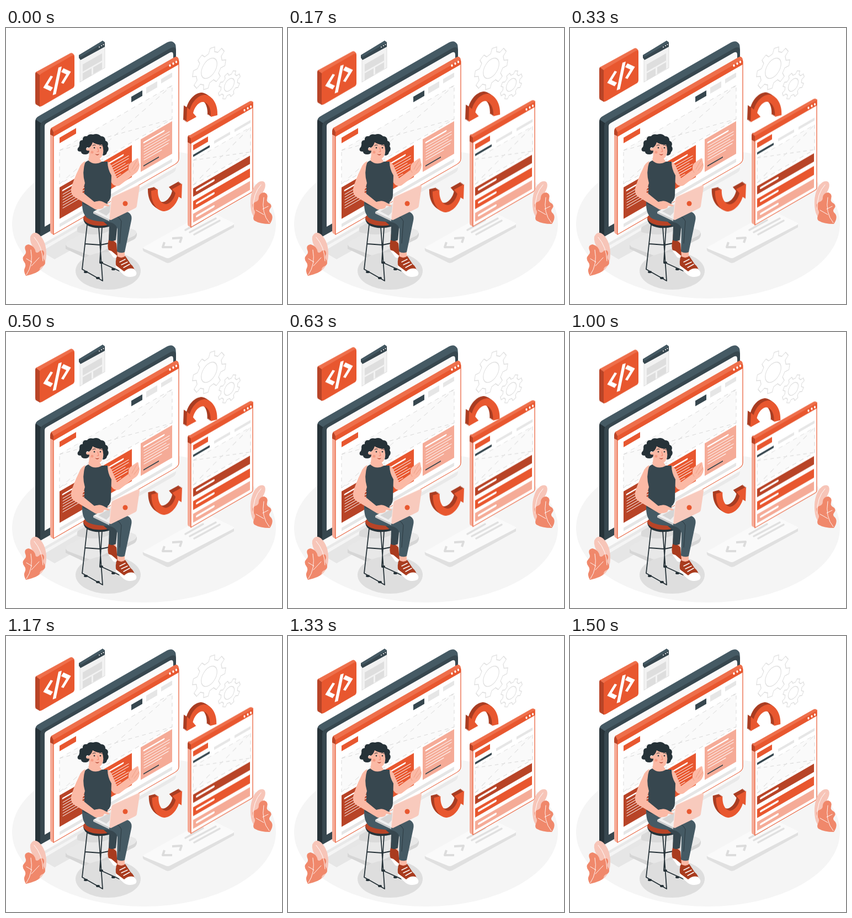
These frames come from a looping animation (500 px wide and 500 px high, 1.54 s). An HTML page:

```html
<!DOCTYPE html>
<html lang="en">
<head>
<meta charset="utf-8">
<title>Responsive web design</title>
<style>
html,body{margin:0;width:100%;height:100%;overflow:hidden;background:#fff}
svg{display:block;width:100%;height:100%}
.o{fill:#e8572f}.d{fill:#b84427}.l{fill:#f5ab97}.w{fill:#fff}.g{fill:#e6e6e6}.k{fill:#37474f}.n{fill:#263238}.s{fill:#fbb9a5}
.line{fill:none;stroke-linecap:round;stroke-linejoin:round}
.dash{fill:none;stroke:#d6d6d6;stroke-width:.9;stroke-dasharray:7 6}
.float{animation:rise .77s cubic-bezier(.37,0,.63,1) -45ms infinite alternate}
#code{--h:-18.5px}
#page{--h:-9px}
#arrows{transform-origin:320px 225px;animation:beat 1.54s ease-in-out infinite}
#arrows .d{fill:#a93d22}
@keyframes rise{to{transform:translateY(var(--h))}}
@keyframes beat{
0%{transform:scale(1)}
10%{transform:scale(1.018)}
21.4%{transform:scale(1.004)}
31%{transform:scale(.992)}
40.9%{transform:scale(1.008)}
51%{transform:scale(1.03)}
64.5%,97.4%{transform:scale(.972)}
100%{transform:scale(1)}
}
</style>
</head>
<body>
<svg viewBox="0 0 500 500">
<defs>
<g id="text" class="line" stroke="#fff" stroke-width="1.1">
<path d="M6 9h36" stroke-width="2.800"/>
<path d="M6 16h46M6 21h46M6 26h40M6 31h46M6 36h44M6 41h32"/>
</g>
<path id="arrow" d="M383 158L371 161C372 143 364 133 355 134C347 136 341 145 339 154L345 161L327 171L328 144L333 148C338 131 350 121 361 121C375 123 384 139 383 158Z"/>
</defs>

<ellipse cx="250" cy="355" rx="239" ry="135" fill="#f5f5f5"/>
<g id="gears" fill="#fff" stroke="#e0e0e0" stroke-width="1.400" stroke-linejoin="round"></g>

<!-- small window -->
<g transform="translate(134 56) skewY(-30)">
<path fill="#f2f2f2" stroke="#dedede" d="M0 0h45v42H0z"/>
<path fill="#dedede" d="M5 13h35v13H5zM5 29h16v13H5zM24 29h16v12H24z"/>
</g>
<path d="M132 54V49L175 23L179 26V34L135 58Z" class="k"/>
<path d="M132 50L175 23L179 26L136 52Z" fill="#455a64"/>
<g class="w"><circle cx="169" cy="34.500" r="1"/><circle cx="173" cy="32" r="1"/><circle cx="176.500" cy="30" r="1"/></g>

<!-- monitor -->
<path d="M64 405L88 419L190 362L165 345Z" fill="#e6e6e6"/>
<path d="M108 393V400L148 419Q156 421 163 417L232 383Q238 379 237 371Z" fill="#d6d6d6"/>
<path d="M108 391Q108 388 113 386L184 347L233 366Q240 370 233 376L163 410Q156 414 149 411L112 397Q108 394 108 391Z" fill="#e8e8e8"/>
<path d="M132 338L200 305L190 365Q172 380 130 370Q127 366 131 358Z" fill="#dadada"/>
<path d="M53 372L62 377L308 240V253Q308 259 303 262L66 397Q62 398 60 394Z" fill="#e9e9e9"/>
<path d="M62 378L308 245V252L62 394Z" fill="#fafafa"/>
<path class="n" d="M53 372V170Q53 163 59 160L70 168V372L62 378Z"/>
<path d="M54 166Q56 161 62 158L292 26Q302 21 307 30Q308 34 308 42L66 174Z" fill="#455a64"/>
<path class="k" d="M62 378V178Q62 172 67 169L297 37Q308 31 308 42V240Z"/>
<path d="M70 360V178Q70 174 74 172L296 45Q303 41 303 49V226Z" fill="#fafafa"/>

<!-- large window -->
<path class="l" d="M80 186L86 188V374L83 373Q80 371 80 368Z"/>
<g transform="translate(86 188) skewY(-30)">
<path d="M0 0H223Q227 0 227 5V180Q227 186 220 186H0Z" fill="#fff" stroke="#e8572f" stroke-width="1.200"/>
<path class="o" d="M0 0H227V9H0Z"/>
<path class="o" d="M11 17h30v10H11z"/>
<path class="k" d="M141 18h20v10h-20z"/>
<path class="g" d="M168 17h20v11h-20zM195 17h20v8h-20zM11 173h204v6H11z"/>
<path fill="#fafafa" d="M11 40h204v61H11z"/>
<path class="dash" d="M11 40h204v61H11zL215 101M11 101L215 40"/>
<path class="d" d="M11 107h58v57H11z"/>
<path class="o" d="M84 106h58v58H84z"/>
<path class="l" d="M158 105h57v59h-57z"/>
<use href="#text" x="11" y="107"/><use href="#text" x="84" y="106"/><use href="#text" x="158" y="105"/>
<path class="k" d="M163 155h28v2h-28z"/>
</g>
<path class="d" d="M80 187Q80 182 84 180L86 188V196L80 193Z"/>
<path d="M82 181L305 53Q311 50 313 57L86 188Z" fill="#ee6f4b"/>
<g class="w"><ellipse cx="297" cy="68" rx="1.700" ry="2.300"/><ellipse cx="303" cy="64.500" rx="1.700" ry="2.300"/><ellipse cx="308.500" cy="61.500" rx="1.700" ry="2.300"/></g>

<!-- code tile -->
<g id="code" class="float">
<path class="d" d="M53 83Q53 80 56 79L62 84V143L55 139Q53 138 53 135Z"/>
<path d="M54 80L116 46Q119 44 122 47L124 50L62 86Z" fill="#ee6f4b"/>
<path class="o" d="M61 88Q61 84 65 82L120 50Q124 48 124 52V103Q124 107 121 109L66 141Q61 144 61 139Z"/>
<path transform="translate(61 84) skewY(-30)" fill="none" stroke="#fff" stroke-width="6" d="M22 16L10.500 28L22 40M37 8L26.500 52M41 16L52.500 28L41 40"/>
</g>

<!-- plate on the floor -->
<path d="M248 398L366 334L413 355V361L297 425Q292 427 288 424L250 405Q247 403 248 398Z" fill="#e0e0e0"/>
<path d="M249 397L363 333Q367 331 371 333L412 353Q415 355 411 357L297 416Q293 418 289 416L250 400Q247 398 249 397Z" fill="#fafafa"/>
<path class="line" stroke="#dcdcdc" stroke-width="4" style="stroke-linecap:butt" d="M287 388L284 397L301 397M301 381L318 380L315 389"/>
<path class="line" stroke="#e0e0e0" stroke-width="3.500" d="M325 366L357 348M333 370L380 345M341 374L387 349"/>

<!-- arrows -->
<g id="arrows">
<g class="d"><use href="#arrow" x="-6" y="-4"/><use href="#arrow" x="-4" y="-2.700"/><use href="#arrow" x="-2" y="-1.300"/></g>
<use href="#arrow" class="o"/>
<g transform="translate(6 3) rotate(180 320 225)">
<g class="d"><use href="#arrow" x="6" y="4"/><use href="#arrow" x="4" y="2.700"/><use href="#arrow" x="2" y="1.300"/></g>
<use href="#arrow" class="o"/>
</g>
</g>

<!-- mobile page -->
<g id="page" class="float">
<path class="l" d="M329 197L335 200V361L331 359Q329 358 329 355Z"/>
<g transform="translate(335 199) skewY(-30)">
<path d="M0 0H112V159Q112 162 109 162H0Z" fill="#fff" stroke="#e8572f" stroke-width="1.200"/>
<path class="o" d="M0 0h112.500v10.500H0zM4 15.500h27v9.500H4z"/>
<path class="k" d="M4 33h30v4H4z"/>
<path class="g" d="M42 30h29v5H42zM79 30h29v5H79z"/>
<path fill="#fafafa" d="M4 43h104v45H4z"/>
<path class="dash" d="M4 43h104v45H4zL108 88M4 88L108 43"/>
<path class="d" d="M4 94h103v15H4z"/>
<path class="o" d="M4 117h103v16H4z"/>
<path class="l" d="M4 140h103v16H4z"/>
<path class="line" stroke="#fff" stroke-width="4" d="M11 101h30M11 124.500h30M11 148h30"/>
</g>
<path class="d" d="M329 199Q329 195 332 194L335 200V210L329 207Z"/>
<path d="M330 196L441 133Q446 131 448 135L335 200Z" fill="#ee6f4b"/>
<g class="w"><ellipse cx="432" cy="149" rx="1.600" ry="2.200"/><ellipse cx="438" cy="145.500" rx="1.600" ry="2.200"/><ellipse cx="443.500" cy="142.500" rx="1.600" ry="2.200"/></g>
</g>

<!-- stool -->
<ellipse cx="185" cy="440" rx="59" ry="34" fill="#dedede"/>
<g class="line" stroke="#263238" stroke-width="1.800">
<path d="M147 356L138 437L175 458L168 360M174 360L170 424L205 440L190 362M143 391L171 393L196 388"/>
<path stroke-width="4" d="M143 442h3M165 453h3M171 425h3M193 437h3"/>
</g>
<path class="n" d="M140 345Q141 359 162 362Q184 364 202 353V343Z"/>
<path class="d" d="M140 344C141 330 200 326 203 344C201 362 143 364 140 344Z"/>

<!-- shoes and legs -->
<path fill="#fbb9a5" d="M186 374h13v18h-13zM201 402h14v14h-14z"/>
<path fill="#a93b1e" d="M186 383Q183 396 186 403L197 416L202 413L200 390Q192 382 186 383Z"/>
<path class="w" d="M185 402L191 404L203 414Q199 419 194 415Z"/>
<path class="k" d="M170 345L203 346L199 384Q192 388 186 384L187 360Z"/>
<path fill="#a93b1e" d="M201 413Q197 424 200 432L215 446L233 444Q234 434 226 428L216 413Q209 419 201 413Z"/>
<path class="w" d="M199 430L214 441Q222 434 231 436Q240 444 234 449Q222 454 213 447L199 434Z"/>
<path class="line" stroke="#fff" stroke-width="1.500" d="M206 424L216 419M209 429L220 424M213 434L224 428"/>
<path fill="#455a64" d="M138 314Q137 336 147 344Q158 351 184 351Q199 353 202 364L201 405Q208 409 215 406L227 349Q230 336 217 332L184 320V306Z"/>
<path class="line" stroke="#263238" stroke-width=".8" d="M184 337Q204 338 209 350L206 390"/>

<!-- raised arm -->
<path class="s" d="M184 242Q191 246 194 256L201 272L222 257Q221 247 226 244L236 237Q240 234 240 239L242 249Q241 260 232 265L206 285Q197 289 191 280L180 262Z"/>
<path class="line" stroke="#ed987f" stroke-width=".8" d="M228 256L237 240M232 258L241 246M222 257L225 262"/>

<!-- body -->
<path class="s" d="M151 228L149 242Q160 252 174 243L168 234Z"/>
<path class="k" d="M149 240Q160 250 174 242L184 242Q184 256 191 267L190 303Q190 314 178 319Q151 327 139 318Q143 297 142 284L138 254Q141 243 149 240Z"/>
<path class="s" d="M144 241Q136 244 132 255Q122 275 118 291Q117 302 124 306L159 327Q165 332 174 326L179 319Q170 312 160 315L138 297L143 281Q137 262 144 241Z"/>
<path class="line" stroke="#ed987f" stroke-width=".8" d="M162 321L174 324"/>

<!-- head -->
<path class="s" d="M149 207Q160 199 176 207Q178 222 174 232Q169 240 161 237Q152 234 150 226Q145 226 145 220Q146 216 150 218Z"/>
<path class="n" d="M151 222Q151 229 144 229Q136 229 136 224Q128 224 130 218Q134 214 133 209Q133 203 139 203Q138 195 147 196Q150 191 158 193Q166 190 172 196Q180 196 180 204Q187 207 184 214Q188 220 183 225Q182 231 175 231Q178 220 174 211Q164 212 157 207Q155 214 150 217Q146 214 145 219Q145 223 151 222Z"/>
<g class="n"><circle cx="160" cy="217" r="1.300"/><circle cx="171" cy="217" r="1.300"/></g>
<path class="line" stroke="#263238" stroke-width="1" d="M157 213Q159 211 162 212M169 212Q172 211 174 213"/>
<path class="line" stroke="#ed8069" stroke-width="1" d="M166 217L168 224L165 224"/>
<path fill="#b5432e" d="M161 228Q165 230 169 228Q166 233 161 228Z"/>
<circle cx="156" cy="225" r="2.500" fill="#f59c85"/>

<!-- laptop -->
<path d="M158 333L187 347V350L158 336Z" fill="#cfcfcf"/>
<path d="M158 333L196 311L222 318L187 347Z" fill="#f0f0f0"/>
<path d="M167 332L194 317L200 321L182 340Z" fill="#d5d5d5"/>
<path class="s" d="M160 316Q168 311 176 315L187 321Q188 324 184 323L178 322L176 326Q168 330 162 326Z"/>
<path d="M187 347L191 309Q192 306 195 305L239 285Q242 284 242 288L237 322Q237 325 233 327L190 348Z" fill="#f8cabd"/>
<path d="M187 347L191 309Q192 306 195 305L239 285" class="line" stroke="#fce5de"/>
<circle cx="216" cy="318" r="4.500" class="o"/>

<!-- plants -->
<g fill="#f7c5b8">
<path d="M44 378Q50 366 60 374Q74 388 73 412Q72 432 60 440Q66 425 52 402Q42 388 44 378Z"/>
<path d="M444 330Q440 305 450 287Q460 274 468 279Q473 286 464 300Q452 318 452 345Q446 340 444 330Z"/>
</g>
<g fill="#f0886b">
<path d="M36 449Q31 440 34 435Q37 429 33 424Q28 417 33 412Q38 408 35 402Q32 393 41 392Q52 395 54 406Q57 409 62 403Q70 401 69 410Q65 415 70 421Q73 428 67 431Q61 433 61 438Q58 444 36 449Z"/>
<path d="M478 355Q460 355 450 349Q446 345 450 338Q453 333 448 327Q444 318 452 315Q458 314 458 306Q460 298 468 298Q476 301 473 309Q471 315 478 318Q483 322 478 328Q475 332 480 336Q486 343 478 355Z"/>
</g>
<path class="line" stroke="#fff" stroke-width=".9" d="M37 447Q50 428 45 402M47 424L37 418M46 431L60 416M51 379Q66 396 67 422M477 353Q462 335 467 307M465 328L475 323M467 338L453 330M462 284Q447 300 448 328"/>
</svg>
<script>
const gears = document.getElementById('gears');

function gear(x, y, r, hole, turn) {
  const teeth = 8, pts = [];
  for (let i = 0; i < teeth; i++) {
    for (const [step, size] of [[-.3, .77], [-.18, 1], [.18, 1], [.3, .77]]) {
      const a = (i + step) / teeth * Math.PI * 2 + turn;
      pts.push((Math.cos(a) * r * size).toFixed(1) + ' ' + (Math.sin(a) * r * size).toFixed(1));
    }
  }
  gears.innerHTML += `<g transform="translate(${x} ${y}) skewY(-30) scale(.866 1)">
    <path d="M${pts.join('L')}Z"/><circle r="${hole}"/></g>`;
}

gear(368, 73, 35, 16.5, .2);
gear(404.5, 103, 23, 10.5, .5);
</script>
</body>
</html>
```
